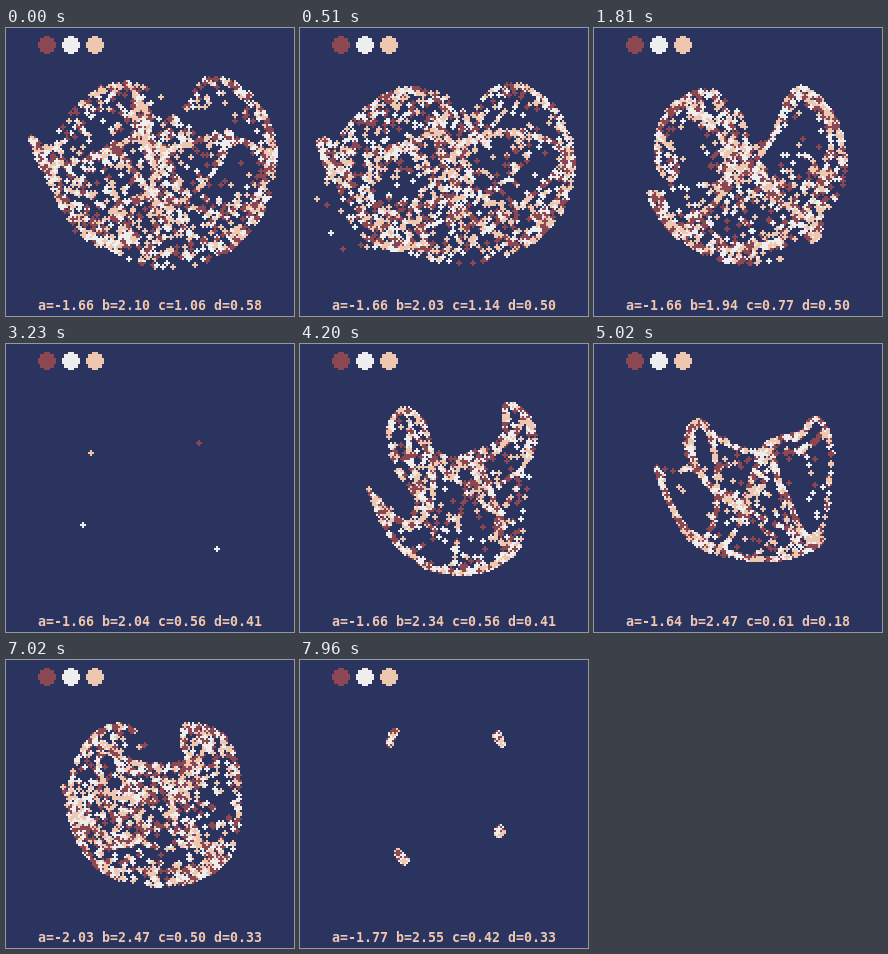
Write an HTML page with a canvas that moves like this. It is 288 by 288 pixels and loops after 7.99 s.

```html
<!DOCTYPE html>
<html lang="en">
<head>
<meta charset="utf-8">
<title>Clifford attractor</title>
<style>
  html, body { margin: 0; width: 100%; height: 100%; overflow: hidden; background: #2b335f; }
  canvas { position: absolute; left: 0; top: 0; width: 288px; height: 288px; image-rendering: pixelated; }
  svg { position: absolute; left: 0; top: 0; }
  text { font: bold 13.29px "DejaVu Sans Mono", monospace; fill: #edc7b0; white-space: pre; }
</style>
</head>
<body>
<canvas id="stage" width="144" height="144"></canvas>
<svg width="288" height="288"><text id="label" x="32" y="282"></text></svg>
<script>
const LOOP = 7990;
const TICK = 100 / 3;
const POINTS = 2000;
const WARM_UP = 200;
const SCALE = 30;
const CENTER = 72;
const BACKGROUND = '#2b335f';
const COLORS = ['#8b4852', '#eeeeee', '#edc7b0'];

// Values in hundredths. Each [tick, goal] walks one hundredth per tick towards its goal.
const KNOBS = {
  a: { from: -166, walks: [[148, -164], [151, -193], [195, -203], [212, -177]] },
  b: { from: 210, walks: [[8, 194], [86, 247], [220, 255]] },
  c: { from: 106, walks: [[1, 114], [17, 56], [141, 61], [157, 50], [219, 42]] },
  d: { from: 58, walks: [[1, 50], [78, 41], [127, 18], [178, 33]] }
};

const ctx = document.getElementById('stage').getContext('2d');
const label = document.getElementById('label');

function knobAt({ from, walks }, tick) {
  const hundredths = walks.reduce((value, [start, goal]) => {
    const steps = Math.min(Math.max(tick - start, 0), Math.abs(goal - value));
    return value + Math.sign(goal - value) * steps;
  }, from);
  return hundredths / 100;
}

function drawDisc(x, y, radius, color) {
  ctx.fillStyle = color;
  for (let i = 0; i <= radius; i++) {
    const half = Math.round(Math.sqrt(radius * radius - i * i));
    ctx.fillRect(x - half, y - i, 2 * half + 1, 1);
    ctx.fillRect(x - half, y + i, 2 * half + 1, 1);
    ctx.fillRect(x - i, y - half, 1, 2 * half + 1);
    ctx.fillRect(x + i, y - half, 1, 2 * half + 1);
  }
}

function drawAttractor({ a, b, c, d }) {
  let x = 1.1, y = 1;
  for (let i = -WARM_UP; i < POINTS; i++) {
    [x, y] = [
      Math.sin(a * y) + c * Math.cos(a * x),
      Math.sin(b * x) + d * Math.cos(b * y)
    ];
    if (i >= 0) {
      drawDisc(Math.round(CENTER + SCALE * x), Math.round(CENTER + SCALE * y), 1, COLORS[i % 3]);
    }
  }
}

function render(now) {
  const tick = Math.floor((now % LOOP) / TICK);
  const params = {};
  for (const name in KNOBS) params[name] = knobAt(KNOBS[name], tick);
  const caption = Object.keys(params).map(name => `${name}=${params[name].toFixed(2)}`).join(' ');
  if (caption === label.textContent) return;

  label.textContent = caption;
  ctx.fillStyle = BACKGROUND;
  ctx.fillRect(0, 0, 144, 144);
  drawAttractor(params);
  COLORS.forEach((color, i) => drawDisc(20 + 12 * i, 8, 4, color));
}

const start = performance.now();
function loop() {
  render(performance.now() - start);
  requestAnimationFrame(loop);
}
loop();
</script>
</body>
</html>
```
